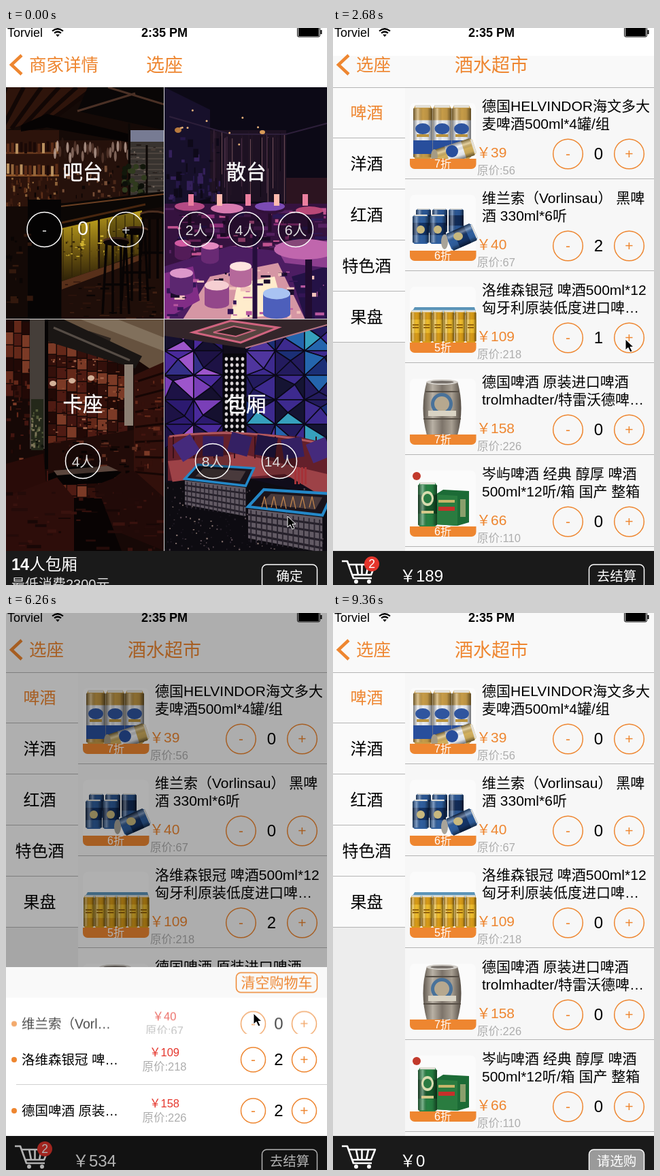
Recreate the animation shown at these times as an HTML page. Size 472x818 px, loop 9880 ms.

```html
<!DOCTYPE html>
<html lang="zh-CN">
<head>
<meta charset="utf-8">
<title>选座</title>
<style>
html, body { margin: 0; width: 100%; height: 100%; overflow: hidden; background: #fff; }
svg { display: block; width: 472px; height: 818px;
  font-family: "Liberation Sans", "Noto Sans CJK SC", "Noto Sans CJK", sans-serif; font-weight: 300; }
text { white-space: pre; }
.mid { text-anchor: middle; }
.or { fill: #ee8630; }
.ring { fill: none; stroke: #ee8630; stroke-width: 1.5; }
.anim { animation: 9880ms linear infinite; }

#home { animation-name: home; }
#page { animation-name: page; }
#oldBack { animation-name: oldBack; }
#oldTitle { animation-name: oldTitle; }
#newBack { animation-name: newBack; }
#newTitle { animation-name: newTitle; }
#tint { animation-name: tint; }
#tintTop { animation-name: tintTop; }
#dim { animation-name: dim; }
#sheet { animation-name: sheet; }
#head { animation-name: head; }
#line1 { animation-name: drop1; }
#line2 { animation-name: drop2; }
#cursor { animation-name: cursor; animation-timing-function: ease-in-out; }
#home, #page, #oldBack, #oldTitle, #newBack, #newTitle { animation-timing-function: cubic-bezier(.36,.66,.04,1); }
#head, #line1, #line2 { animation-timing-function: ease-in-out; }

@keyframes home { 0%, 7.22% { transform: none } 12.28%, 100% { transform: translateX(-144px) } }
@keyframes page { 0%, 7.22% { transform: translateX(480px) } 12.28%, 100% { transform: none } }
@keyframes oldBack { 0%, 7.22% { transform: none; opacity: 1 } 12.28%, 100% { transform: translateX(-139px); opacity: 0 } }
@keyframes oldTitle { 0%, 7.22% { transform: none; opacity: 1 } 12.28%, 100% { transform: translateX(-119px); opacity: 0 } }
@keyframes newBack { 0%, 7.22% { transform: translateX(140px); opacity: 0 } 12.28%, 100% { transform: none; opacity: 1 } }
@keyframes newTitle { 0%, 7.22% { transform: translateX(356px) } 12.28%, 100% { transform: none } }
@keyframes tint { 0%, 7.1% { opacity: 0 } 7.11%, 100% { opacity: 1 } }
@keyframes tintTop { 0%, 47% { opacity: 0 } 47.01%, 100% { opacity: 1 } }
@keyframes dim { 0%, 47% { opacity: 0 } 50.2%, 83.9% { opacity: 1 } 83.91%, 100% { opacity: 0 } }
@keyframes sheet {
  0%, 47% { transform: translateY(270px); animation-timing-function: ease-out }
  50.2%, 83.9% { transform: none } 83.91%, 100% { transform: translateY(270px) }
}
@keyframes head {
  0%, 62.2% { transform: none } 65.3%, 72.7% { transform: translateY(75px) }
  75.8%, 100% { transform: translateY(150px) }
}
@keyframes drop1 { 0%, 62.2% { transform: none; opacity: 1 } 65.3%, 100% { transform: translateY(75px); opacity: 0 } }
@keyframes drop2 { 0%, 72.7% { transform: none; opacity: 1 } 75.8%, 100% { transform: translateY(75px); opacity: 0 } }
@keyframes cursor {
  0%, .4% { transform: translate(414px, 717px) }
  2.2% { transform: translate(426px, 765px) }
  4.25%, 9% { transform: translate(409px, 795px) }
  16.4%, 20.3% { transform: translate(430px, 315px) }
  23.58%, 28.8% { transform: translate(430px, 457px) }
  33%, 39.2% { transform: translate(431px, 605px) }
  44.23%, 47% { transform: translate(51px, 806px) }
  55.57%, 63.4% { transform: translate(364px, 588px) }
  66.8%, 72.8% { transform: translate(363px, 656px) }
  79.96%, 88.4% { transform: translate(358px, 730px) }
  94.74%, 100% { transform: translate(436px, 830px) }
}
</style>
</head>
<body>
<svg id="stage" viewBox="0 0 472 818"></svg>
<script>
const LOOP = 9880;
let seed = 7;
const rnd = (a = 0, b = 1) => (seed = seed * 16807 % 2147483647, a + (b - a) * seed / 2147483647);
const pick = list => list[Math.floor(rnd(0, list.length))];
const times = (n, f) => Array.from({ length: n }, (_, i) => f(i)).join('');

const rect = (x, y, w, h, fill, o = '') => `<rect x="${x}" y="${y}" width="${w}" height="${h}" fill="${fill}" ${o}/>`;
const poly = (pts, fill, o = '') => `<polygon points="${pts}" fill="${fill}" ${o}/>`;
const oval = (x, y, rx, ry, fill, o = '') => `<ellipse cx="${x}" cy="${y}" rx="${rx}" ry="${ry}" fill="${fill}" ${o}/>`;
const path = (d, stroke, w = 1, o = '') => `<path d="${d}" fill="none" stroke="${stroke}" stroke-width="${w}" ${o}/>`;
const text = (x, y, size, s, o = '') => `<text x="${x}" y="${y}" font-size="${size}" ${o}>${s}</text>`;
const mid = (x, y, size, s, cls = '', o = '') => text(x, y, size, s, `class="mid ${cls}" ${o}`);
const group = (id, s) => `<g id="${id}" class="anim">${s}</g>`;
const fade = (id, colors, o = 'x2="0" y2="1"') => `<linearGradient id="${id}" ${o}>`
  + colors.map((c, i) => `<stop offset="${i / (colors.length - 1)}" stop-color="${c}"/>`).join('') + '</linearGradient>';
const specks = (n, x, y, w, h, colors, sw = 3, sh = 3) =>
  times(n, () => rect(rnd(x, x + w), rnd(y, y + h), rnd(1, sw), rnd(1, sh), pick(colors)));

// Photo scenes
function bar() {
  const stool = (x, y, h) => path(`M${x - 14} ${y}L${x - 20} ${y + h}M${x + 14} ${y}L${x + 19} ${y + h}M${x - 5} ${y}V${y + h}M${x + 7} ${y}V${y + h}M${x - 17} ${y + h * .6}H${x + 17}`, '#080404', 3.5)
    + oval(x, y, 19, 5, '#4a2d1f') + oval(x, y + 3, 19, 5, '#0c0605');
  return rect(0, 87, 233, 341, '#150a07')
    + poly('0,87 130,87 70,128 0,150', '#2e140b')
    + times(6, i => path(`M${i * 26} 87L${i * 14 - 20} 148`, '#120705', 6))
    + poly('120,87 232,87 232,150 105,122', '#090606') + path('M105 122L190 96M150 87L232 112', '#4a3025', 3)
    + rect(0, 150, 78, 112, '#2c130b') + rect(0, 215, 78, 3, '#8a5228') + rect(0, 182, 78, 3, '#63361c')
    + times(24, i => rect(i % 12 * 6.5 + 1, (i < 12 ? 199 : 166) + rnd(0, 4), 4, 15, pick(['#94653a', '#1a0906', '#5b2c17', '#b88f5e'])))
    + specks(60, 0, 218, 80, 42, ['#5d2f18', '#0c0504', '#8b6038', '#3c1c10'], 4, 9)
    + rect(78, 165, 104, 92, '#25110b') + specks(45, 80, 200, 95, 50, ['#4a2718', '#0d0605', '#764d35'], 5, 7)
    + times(30, i => oval(72 + i * 3.7, 168 + rnd(0, 24), 2, 8, pick(['#94776a', '#56382d', '#c0a69a', '#2b1812']), 'opacity=".8"'))
    + poly('22,143 60,126 182,156 182,168 60,146 22,152', '#060303')
    + rect(183, 150, 50, 105, '#38332f') + rect(183, 150, 50, 17, '#777b93')
    + times(9, i => path(`M183 ${176 + i * 8}H233`, '#61544d', 1)) + specks(40, 183, 168, 48, 76, ['#221a17', '#6e6158', '#4b3f38'], 7, 3)
    + path('M181 140V260M207 172V255', '#0d0806', 3)
    + times(26, () => oval(rnd(174, 206), rnd(203, 248), 4, 4, pick(['#12180b', '#303b1e', '#0c0f09'])))
    + poly('78,258 232,240 232,262 82,292 30,270', '#0b0705') + path('M80 262L232 244', '#6a3f22', 2) + path('M82 286L205 259', '#48260f', 3)
    + poly('82,294 135,282 135,354 82,372', 'url(#glow)') + poly('138,281 200,268 200,330 138,353', 'url(#glow)')
    + times(9, i => path(`M${84 + i * 13} ${296 - i * 3}v72`, '#2d2007', 2, 'opacity=".5"')) + specks(70, 84, 295, 110, 45, ['#372808', '#d3b532', '#5b460d'], 6, 3)
    + rect(32, 252, 49, 175, '#060404') + rect(0, 262, 32, 165, '#130906') + specks(20, 0, 290, 32, 130, ['#32180d', '#0a0504'], 12, 8)
    + poly('82,374 232,325 232,428 82,428', '#1f0e09') + poly('82,372 200,332 200,340 82,384', '#58301a')
    + specks(50, 82, 370, 148, 56, ['#3e1f12', '#0a0504', '#2c130b'], 18, 3)
    + stool(216, 273, 95) + stool(190, 296, 105) + stool(162, 312, 108);
}

function lounge() {
  const table = (x, y, w, c) => path(`M${x} ${y}v${w * 1.7}`, '#240c2a', 5) + oval(x, y + 4, w, w * .3, '#32113a') + oval(x, y, w, w * .3, c);
  const seat = (x, y, w, c, d) => `<path d="M${x - w} ${y}v${w * 1.5}a${w} 7 0 0 0 ${2 * w} 0v-${w * 1.5}z" fill="${d}"/>` + oval(x, y, w, w * .42, c);
  return rect(233, 87, 240, 341, '#0c0916')
    + poly('233,87 300,120 300,250 233,265', '#17102b') + rect(300, 150, 112, 105, '#1d1122')
    + specks(50, 233, 160, 80, 90, ['#251747', '#0e0919', '#34205a'], 9, 14)
    + times(32, () => path(`M${rnd(300, 412)} ${150 + rnd(0, 14)}V${rnd(205, 262)}`, pick(['#4b2f46', '#271827', '#74515a', '#0d0811'])))
    + path('M240 130L330 156H412L472 140', '#2d1f3a', 2)
    + times(9, () => oval(rnd(240, 465), rnd(120, 175), 1.5, 1.5, '#e6b17a'))
    + oval(253, 150, 5, 4, '#b87a3e') + oval(377, 153, 4, 3, '#d89a58')
    + rect(412, 220, 61, 50, '#2c1420') + rect(233, 258, 240, 170, '#35123f')
    + specks(90, 233, 262, 235, 70, ['#8d2e78', '#190922', '#54205f', '#c0538f', '#2c1754'], 22, 6)
    + poly('233,350 330,320 472,335 472,428 233,428', '#4c1d62')
    + poly('300,365 400,345 440,428 260,428', '#d596a4') + poly('340,375 395,365 410,420 330,428', '#ffeccc')
    + poly('233,360 275,350 285,400 233,428', '#812d86') + poly('420,365 472,350 472,428 440,428', '#241246')
    + specks(70, 233, 355, 235, 70, ['#341555', '#b8589f', '#f2c3bb', '#1b0d2b'], 16, 8)
    + table(270, 262, 22, '#b44a84') + table(325, 265, 24, '#d77bb0') + table(388, 262, 22, '#7b4bb4') + table(446, 268, 20, '#b94978')
    + times(5, i => rect(268 + i * 42, 244, 8, 17, i % 2 ? '#ffb9ae' : '#eb7f9f'))
    + seat(260, 316, 12, '#d05aa0', '#531c58') + seat(300, 320, 13, '#e48ac0', '#692a74') + seat(345, 350, 16, '#ffe4e0', '#b5699b')
    + seat(258, 360, 17, '#dd98ca', '#5c2770') + seat(310, 378, 18, '#f6cfd2', '#93478a') + seat(398, 390, 20, '#a9c3f2', '#4d5fbb')
    + poly('395,318 472,312 472,352 410,345', '#8d3f8f') + oval(440, 325, 46, 15, '#c066ad') + path('M445 340V428', '#200b2f', 10)
    + path('M366 300V428', '#250e3c', 7);
}

function booth() {
  const tone = ['#4f1b13', '#34100b', '#642819', '#220906', '#7b3a26', '#421510'];
  const tiles = (x, y, w, h, n) => times(n * 2, i => times(n, j => rect(x + j * w, y + i * h + j * 2, w - 1.5, h - 1.5, pick(tone))));
  return rect(0, 428, 233, 341, '#160806') + tiles(60, 446, 15, 17, 8) + specks(150, 62, 475, 112, 150, ['#8d4a30', '#1a0705', '#a4644a', '#30100a'], 6, 3)
    + tiles(0, 428, 12, 19, 3) + specks(30, 0, 500, 35, 150, tone, 9, 8)
    + poly('45,428 233,428 233,515 182,480', '#66523f')
    + poly('110,428 165,428 233,455 233,475', '#81705c') + rect(122, 445, 34, 9, '#2f2621', 'transform="rotate(18 122 445)"')
    + poly('45,428 85,428 200,482 190,500 60,460', '#1a1614') + path('M70 440L182 488', '#554c45', 3)
    + poly('188,510 233,490 233,690 188,660', '#32100b')
    + times(7, i => path(`M190 ${520 + i * 22}L233 ${506 + i * 25}`, '#160604', 3)) + specks(45, 189, 515, 40, 130, tone, 10, 7)
    + rect(35, 428, 22, 190, '#453e39') + rect(57, 428, 5, 220, '#060404') + rect(174, 494, 13, 90, '#8b7e72')
    + rect(37, 545, 18, 75, '#24281a') + specks(35, 36, 560, 18, 55, ['#555c3a', '#11140c', '#7d7458'], 4, 6)
    + times(3, i => oval(69 + i * 28, 522 - i * 4, 5, 4, '#d3b199'))
    + poly('62,610 188,590 188,660 62,660', '#210b08') + specks(40, 62, 605, 125, 45, ['#3f1610', '#0b0403', '#5e2c1e'], 12, 5)
    + poly('62,655 110,640 170,652 150,668 62,672', '#060303') + poly('70,650 150,643 165,650 75,657', '#5b463d')
    + poly('0,640 55,625 62,700 0,730', '#290b08') + poly('0,688 75,660 100,690 100,768 0,768', '#2d0d0a')
    + poly('130,672 188,650 233,690 233,768 140,730', '#210a08') + poly('100,690 140,690 170,768 100,768', '#080303')
    + specks(60, 0, 680, 232, 85, ['#180706', '#39120e', '#240b09'], 24, 5);
}

function suite() {
  const violet = ['#2c1a70', '#4a2a9c', '#7a3fb8', '#1d1245', '#15102f', '#9d55cb', '#343088'];
  const blue = ['#2465ad', '#1b2f76', '#231b5e', '#3d2a8e', '#151433', '#36a0bd', '#4f359e'];
  const wall = (x0, cols, tone) => times(5, r => times(cols, c => {
    const x = x0 + c * 43, y = 438 + r * 36, cx = x + rnd(10, 33), cy = y + rnd(8, 28);
    const p = [`${x},${y}`, `${x + 43},${y}`, `${x + 43},${y + 36}`, `${x},${y + 36}`];
    return p.map((a, i) => poly(`${a} ${p[(i + 1) % 4]} ${cx},${cy}`, pick(tone), 'stroke="#0a0819" stroke-width="1.6"')).join('');
  }));
  const block = (x, y, k) => `<g transform="translate(${x} ${y}) scale(${k})">`
    + poly('0,3 104,15 104,64 0,44', '#625a64')
    + times(4, i => path(`M0 ${11 + i * 9}L104 ${25 + i * 11}`, '#241f29', 3))
    + times(14, i => path(`M${4 + i * 7.4} ${5 + i}v45`, '#2b2530', 1.8))
    + poly('0,0 22,-24 118,-18 104,12', '#1a141c', 'stroke="#2488c8" stroke-width="4"') + poly('18,-4 32,-18 104,-13 94,4', '#493a3c') + '</g>';
  return rect(233, 428, 240, 341, '#100c1a') + wall(233, 2, violet) + wall(353, 3, blue)
    + poly('233,428 472,428 472,436 350,470 233,452', '#33252a') + poly('275,447 330,430 400,440 345,462', '#574440', 'stroke="#d0647f" stroke-width="3"')
    + poly('305,447 335,438 365,444 338,453', '#2e2222', 'stroke="#c9667e" stroke-width="2"') + path('M352 470L472 436', '#b57482', 2)
    + rect(319, 478, 34, 125, '#08070c')
    + times(13, r => times(4, c => oval(324 + c * 8, 486 + r * 9, 2.3, 2.8, '#d9d3d6')))
    + poly('238,600 320,592 430,600 472,610 472,690 420,660 238,665', '#64202b')
    + poly('238,636 345,625 472,655 472,692 410,655 245,668', '#9d4247') + path('M240 600Q350 585 472 612', '#b2585e', 3)
    + times(8, i => path(`M${246 + i * 30} 600v32`, '#3a1019', 2))
    + times(6, i => poly('-17,-12 13,-17 18,12 -12,17', pick(['#342063', '#452a7c', '#211542']), `transform="translate(${265 + i * 39} ${611 + Math.abs(i - 2) * 3}) rotate(${rnd(-25, 25)})"`))
    + poly('233,668 330,655 472,690 472,768 233,768', '#0d0b11')
    + specks(260, 233, 672, 236, 94, ['#5d4d55', '#2b232e', '#85726d', '#1c1720'], 2.5, 2.5)
    + block(263, 662, .86) + block(356, 703, 1.05)
    + times(6, i => path(`M${376 + i * 14} 704l4-16l4 18`, '#bd824c', 1.3)) + times(4, i => rect(424 + i * 5, 645, 3, 25, '#a53238'));
}

// Product pictures, drawn from the row's top left corner
const can = (x, y, w, h, body, band, o = '') => `<g transform="translate(${x} ${y})"><g ${o}>`
  + `<path d="M${w * .12} 0H${w * .88}L${w} ${h * .08}V${h * .94}L${w * .88} ${h}H${w * .12}L0 ${h * .94}V${h * .08}Z" fill="${body}"/>`
  + rect(0, h * .28, w, h * .42, band) + rect(w * .1, 0, w * .8, h * .05, '#e3e0d8')
  + rect(0, h * .06, w, h * .9, 'url(#round)') + '</g></g>';
const pictures = [
  () => times(3, i => can(118 + i * 28.5, 26, 28, 80, '#c79c48', '#e9edf4') + rect(118 + i * 28.5, 78, 28, 20, '#284e9c') + oval(132 + i * 28.5, 61, 11, 8, '#2f559f') + rect(123 + i * 28.5, 69, 18, 4, '#b9933f'))
    + can(204, 74, 26, 60, '#d3b15f', '#eef1f6', 'transform="rotate(72)"') + oval(175, 94, 9, 9, '#284e9c') + oval(149, 101, 5, 10, '#a59b84'),
  () => times(3, i => can(122 + i * 24, 43, 22, 36, '#2b5794', '#122c58')) + times(2, i => can(117 + i * 25, 52, 24, 43, '#2f5f9f', '#143468') + oval(129 + i * 25, 74, 6, 6, '#c8b87e'))
    + can(203, 64, 27, 42, '#2f5f9f', '#143468', 'transform="rotate(66)"') + oval(184, 84, 7, 6, '#c8b87e') + oval(164, 92, 5, 11, '#a8a49a'),
  () => poly('120,53 208,53 210,60 116,60', '#5b94b8') + rect(116, 57, 94, 8, '#b7cad2')
    + times(6, i => can(114 + i * 16.2, 58, 15.5, 47, '#d99c18', '#f0bd2c') + path(`M${117 + i * 16.2} 79h9M${117 + i * 16.2} 83h9`, '#94640c', 2)),
  () => '<path d="M138 27H183Q194 66 183 106H138Q127 66 138 27Z" fill="url(#steel)"/>' + oval(160.5, 28, 23, 4, '#d2cec8') + oval(160.5, 28, 17, 2, '#77706a')
    + path('M136 42H185M133 82H188', '#574f46', 2) + oval(160, 60, 16, 16, '#49729a') + oval(160, 60, 11, 11, '#b6a88f') + rect(140, 70, 41, 8, '#d9d3c4'),
  () => oval(123, 31, 6, 6, '#c23a2c') + poly('151,58 162,51 200,53 200,99 183,104 151,102', '#1c6b36') + poly('151,58 183,60 183,104 151,102', '#2a7c40')
    + rect(155, 76, 24, 6, '#c6302a') + rect(155, 66, 24, 4, '#c7b56a') + rect(187, 65, 8, 26, '#b9b584', 'opacity=".7"')
    + can(125, 40, 28, 66, '#278243', '#17592c') + oval(139, 64, 9, 11, '#d9dcb0') + oval(139, 64, 6, 7, '#2a7a42') + rect(130, 82, 18, 4, '#d4c88a'),
];

const goods = [
  ['德国HELVINDOR海文多大', '麦啤酒500ml*4罐/组', 39, 56, 7],
  ['维兰索（Vorlinsau） 黑啤', '酒 330ml*6听', 40, 67, 6, '维兰索（Vorl…'],
  ['洛维森银冠 啤酒500ml*12', '匈牙利原装低度进口啤…', 109, 218, 5, '洛维森银冠 啤…'],
  ['德国啤酒 原装进口啤酒', 'trolmhadter/特雷沃德啤…', 158, 226, 7, '德国啤酒 原装…'],
  ['岑屿啤酒 经典 醇厚 啤酒', '500ml*12听/箱 国产 整箱', 66, 110, 6],
];

const stepper = (x, y, r, gap, id) => [-1, 1].map(k =>
  `<circle class="ring" cx="${x + k * gap}" cy="${y}" r="${r}"/>` + mid(x + k * gap, y + 7, 21, k < 0 ? '-' : '+', 'or')).join('')
  + mid(x, y + 8, 24, 0, '', `id="${id}"`);

const product = ([a, b, price, old, off], i) => `<g transform="translate(0 ${87 + 135 * i})">`
  + rect(113, 23, 97, 97, '#fbfbfb', 'rx="7"') + pictures[i]()
  + '<path class="or" d="M113 105H210.500V113a7 7 0 0 1-7 7H120a7 7 0 0 1-7-7Z"/>' + mid(161.5, 118, 16, off + '折', '', 'fill="#fff"')
  + text(219, 35, 21, a) + text(219, 61, 21, b)
  + text(211, 103, 21, '￥' + price, 'class="or"') + text(212, 128, 16.5, '原价:' + old, 'fill="#adadad"')
  + stepper(390.5, 98, 21.8, 45, 'n' + i) + path('M106 134.500H473', '#b4b4b4') + '</g>';

const sheetRow = i => {
  const [, , price, old, , name] = goods[i], y = 581 + (i - 1) * 75;
  return group('line' + i, rect(0, y - 38, 473, 75, '#fff') + oval(12, y, 4, 4, '#ee8630') + text(23, y + 7, 19.5, name)
    + mid(233, y - 5, 16.5, '￥' + price, '', 'fill="#e5352c"') + mid(233, y + 16, 16.5, '原价:' + old, '', 'fill="#adadad"')
    + stepper(401, y, 18, 37.5, 'm' + i) + (i < 3 ? path(`M15 ${y + 36.5}H473`, '#d0d0d0') : ''));
};

const choice = (x, y, s) => `<circle cx="${x}" cy="${y}" r="25.500" fill="#000" fill-opacity=".3" stroke="#fff" stroke-width="1.500"/>` + mid(x, y + 8, 21, s, '', 'fill="#ddd"');
const heading = (x, y, s) => mid(x, y, 29.5, s, '', 'fill="#fff" stroke="#fff" stroke-width=".4"');
const button = (s, id) => rect(376.5, 788, 81, 36, '#1a1a1a', `id="${id}Box" rx="7" stroke="#fff" stroke-width="1.500"`) + mid(417, 812, 19.5, s, '', `id="${id}" fill="#fff"`);
const cell = (id, s) => `<g clip-path="url(#${id})">${s}</g>`;
const clip = (id, x, y, w, h) => `<clipPath id="${id}"><rect x="${x}" y="${y}" width="${w}" height="${h}"/></clipPath>`;

const defs = '<defs>' + clip('c1', 0, 87, 232, 340) + clip('c2', 233, 87, 247, 340) + clip('c3', 0, 428, 232, 340) + clip('c4', 233, 428, 247, 340)
  + clip('above', 0, 0, 472, 768) + fade('glow', ['#b79a1c', '#6e5711', '#2c2007'])
  + fade('steel', ['#5f574e', '#b9b1a5', '#7d746a', '#a89f92', '#544c44'], '')
  + fade('round', ['#0007', '#fff6', '#0000', '#0001', '#0008'], '') + '</defs>';

const home = rect(0, 87, 480, 682, '#ddd') + cell('c1', bar()) + cell('c2', lounge()) + cell('c3', booth()) + cell('c4', suite())
  + heading(113, 222, '吧台') + heading(353, 222, '散台') + heading(113, 563, '卡座') + heading(353, 563, '包厢')
  + choice(56.5, 296, '-') + mid(113, 304, 29, 0, '', 'fill="#fff"') + choice(176.5, 296, '+')
  + choice(280, 296, '2人') + choice(353, 296, '4人') + choice(426, 296, '6人')
  + choice(113, 636, '4人') + choice(304, 636, '8人') + choice(402, 636, '14人')
  + rect(0, 768, 480, 50, '#1a1a1a') + text(8, 796, 23.5, '<tspan font-weight="700">14</tspan>人包厢', 'fill="#fff"')
  + text(8, 824, 20, '最低消费2300元', 'fill="#ddd"') + button('确定', 'ok');

const cart = path('M13 783H21L30 808H57M22 788H62L56 803H28M34 788L37 803M42.500 788V803M52 788L49 803', '#fff', 2.6, 'stroke-linejoin="round"')
  + oval(34, 813, 3, 3, '#fff') + oval(53, 813, 3, 3, '#fff');

const page = rect(-7, 87, 480, 690, '#f7f7f7') + rect(-7, 87, 113, 375, '#fafafa') + rect(-7, 462, 113, 306, '#ededed')
  + rect(-7, 87, 3, 75, '#ee8630')
  + ['啤酒', '洋酒', '红酒', '特色酒', '果盘'].map((s, i) => mid(49.5, 133 + 75 * i, 24, s, i ? '' : 'or') + path(`M-7 ${161.5 + 75 * i}H106`, '#b4b4b4')).join('')
  + goods.map(product).join('') + path('M-7 87.500H473', '#b4b4b4')
  + rect(-7, 768, 480, 50, '#1a1a1a') + cart
  + `<g id="badge"><circle cx="57" cy="787" r="11" fill="#e5352c"/>${mid(57, 793, 17.5, '', '', 'id="kinds" fill="#fff"')}</g>`
  + text(98, 813, 24, '', 'id="total" fill="#fff"') + button('', 'pay');

const nav = rect(0, 0, 472, 87, '#fff')
  + '<rect id="tint" class="anim" y="41" width="472" height="46" fill="#f9f9f9"/><rect id="tintTop" class="anim" width="472" height="41" fill="#f9f9f9"/>'
  + text(2, 13, 18, 'Torviel') + path('M68 4.500Q76 -2 84 4.500M71 7.500Q76 3.500 81 7.500', '#000', 2.2) + poly('73,9.500 79,9.500 76,13', '#000')
  + mid(233, 13, 18, '2:35 PM', '', 'font-weight="700"')
  + rect(428.5, -1, 33, 14, 'none', 'rx="2" stroke="#000"') + rect(430, 0, 30, 12, '#000') + rect(462.5, 3, 2, 6, '#000')
  + path('M23 40L8 54L23 68', '#ee8630', 4.5)
  + '<g class="or">' + group('oldBack', text(34, 63, 25.5, '商家详情')) + group('oldTitle', text(206, 64, 27, '选座'))
  + group('newBack', text(34, 63, 25.5, '选座')) + group('newTitle', text(179, 64, 27, '酒水超市')) + '</g>';

const sheet = group('head', rect(0, 498, 473, 45, '#f9f9f9') + rect(0, 543, 473, 275, '#fff')
  + rect(338.5, 506, 119, 29, 'none', 'class="ring" rx="7"') + mid(398, 528, 21, '清空购物车', 'or'))
  + sheetRow(1) + sheetRow(2) + sheetRow(3);

const $ = id => document.getElementById(id);
$('stage').innerHTML = defs + group('home', home) + group('page', page) + nav
  + '<rect id="dim" class="anim" width="472" height="818" fill="#000" fill-opacity=".3"/>'
  + `<g clip-path="url(#above)">${group('sheet', sheet)}</g>`
  + group('cursor', '<path d="M0 0V16L4 12.500L7 19L10 17.700L7 11.500H12Z" stroke="#fff"/>');

// [time, product, amount]
const taps = [[1860, 1, 1], [2030, 1, 2], [2680, 2, 1], [2860, 2, 2], [3560, 3, 1], [3730, 3, 2],
  [5730, 1, 1], [6150, 1, 0], [7010, 2, 1], [7190, 2, 0], [8140, 3, 1], [8320, 3, 0]];
const LEAD = 40; // covers the delay until the next paint
const clock = $('cursor').getAnimations()[0];
let shown = -1;

function update() {
  const now = (clock.currentTime || 0) % LOOP + LEAD;
  const done = taps.filter(([t]) => t <= now);
  if (done.length !== shown) {
    shown = done.length;
    const amount = [0, 0, 0, 0];
    done.forEach(([, i, n]) => amount[i] = n);
    for (let i = 1; i < 4; i++) $('n' + i).textContent = $('m' + i).textContent = amount[i];
    const kinds = amount.filter(Boolean).length;
    $('kinds').textContent = kinds;
    $('badge').style.display = kinds ? '' : 'none';
    $('total').textContent = '￥' + amount.reduce((sum, n, i) => sum + n * goods[i][2], 0);
    $('pay').textContent = kinds ? '去结算' : '请选购';
    $('payBox').setAttribute('fill', kinds ? '#1a1a1a' : '#9a9a9a');
  }
  requestAnimationFrame(update);
}
update();
</script>
</body>
</html>
```
